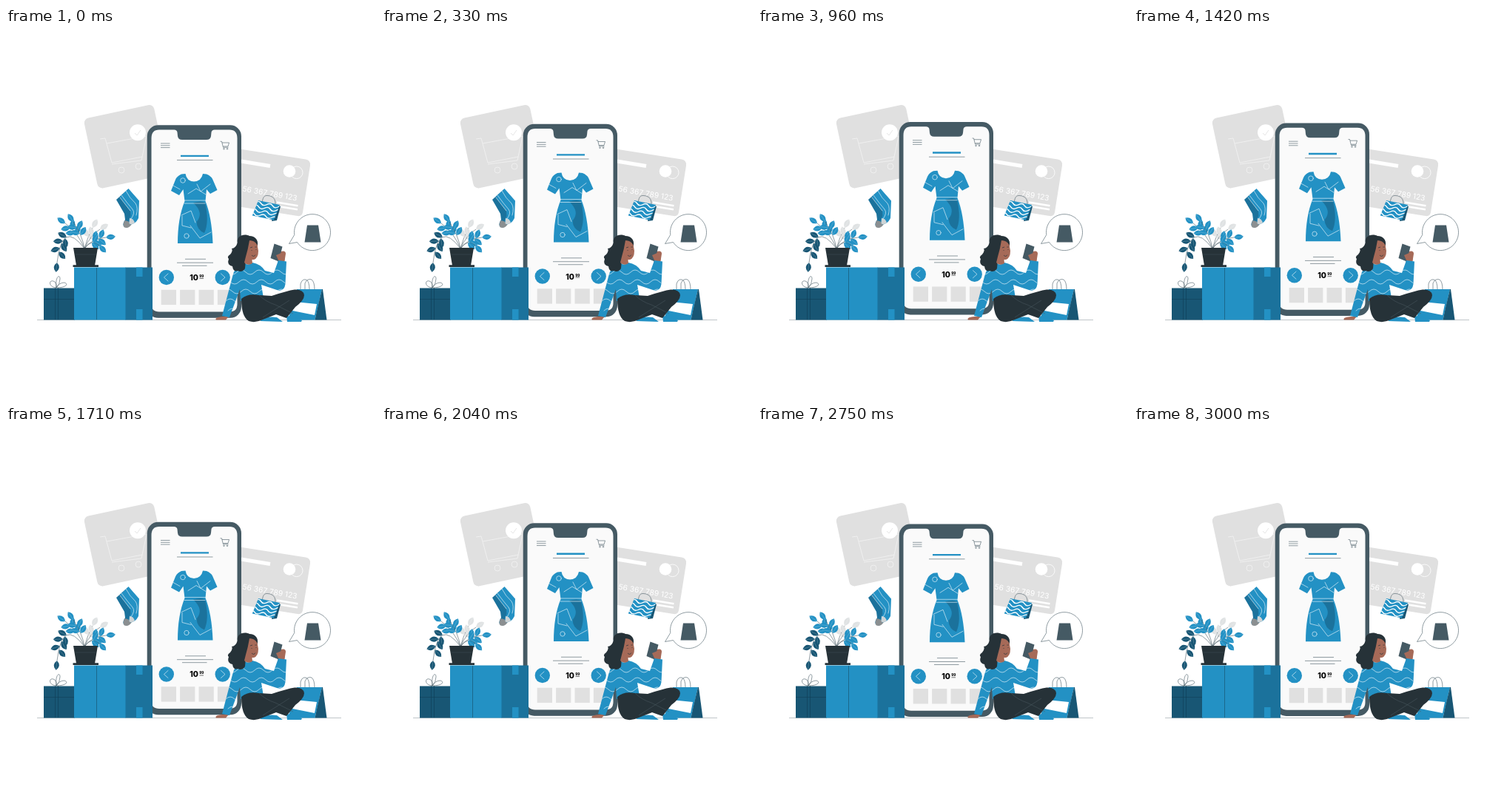
An HTML page for the animation above (3040 ms loop, 500 by 500 pixels).

```html
<!DOCTYPE html>
<html lang="en">
<head>
<meta charset="utf-8">
<title>Online shopping</title>
<style>
html,body{margin:0;width:100%;height:100%;overflow:hidden;background:#fff}
svg{display:block;width:100vw;height:100vh}
.thin{fill:none;stroke:#455a64;stroke-width:.6}
.wave{fill:none;stroke:#e8f4fa;stroke-width:.65;stroke-linecap:round}
.faint{fill:none;stroke:#f5f5f5;stroke-width:.7}
.blue{fill:#2391c4}.mid{fill:#1b729c}.deep{fill:#185674}
.dark{fill:#263238}.slate{fill:#455a64}.grey{fill:#e0e0e0}.white{fill:#fff}.skin{fill:#a66a58}
</style>
</head>
<body>
<svg viewBox="0 0 500 500" xmlns="http://www.w3.org/2000/svg">
<defs>
  <path id="sweaterShape" d="M321 317Q327 322 333 317Q344 319 350 328L362 331L368 314L379 315.500L377.500 346Q376 357 366 354L345 347L348 365L317 369L316 353L302 391L292 389L306 336Q309 322 321 317Z"/>
  <clipPath id="sweaterClip"><use href="#sweaterShape"/></clipPath>
  <clipPath id="bagClip"><rect width="30" height="20.500"/></clipPath>
</defs>

<path d="M42 394.500H453" stroke="#b0b8bc" stroke-width=".8"/>

<g id="cartCard">
  <rect class="grey" x="104.500" y="123" width="96.500" height="97" rx="7" transform="rotate(-12.1 104 123)"/>
  <path class="faint" d="M127 150L134 149L143 182L184 174M136 156L190 146L183 179L143 184"/>
  <g class="faint"><circle cx="156" cy="192" r="4"/><circle cx="179" cy="187" r="4"/></g>
  <circle class="white" cx="178" cy="141.300" r="11"/>
  <path d="M174 142l3 3 5-7" fill="none" stroke="#e0e0e0" stroke-width=".8"/>
</g>

<g id="payCard">
  <path class="grey" d="M300 161L405 177.500Q412 179 411 186L401 249Q400 255 394 254L300 239Z"/>
  <path d="M310 178.800L357 186.500" stroke="#fff" stroke-width="5"/>
  <path d="M366 235.600L394.500 240.200M366 240.800L394 245.300" stroke="#fff" stroke-width="2.500"/>
  <circle class="white" cx="383" cy="193.500" r="8.300"/>
  <circle cx="392.700" cy="195.300" r="8.300" fill="none" stroke="#fff" stroke-width=".8"/>
  <text transform="translate(319 220.500) rotate(10)" font-family="Inter,Roboto,sans-serif" font-size="10.300" fill="#fff">56 367 789 123</text>
</g>

<g id="phone">
  <rect class="slate" x="190.700" y="131.300" width="127.300" height="260.500" rx="15"/>
  <path fill="#fafafa" d="M207 137.500H227Q231 137.500 231.500 141L232 146Q232.500 151 238 151H271Q276.500 151 277 146L277.500 141Q278 137.500 282 137.500H302Q312.500 137.500 312.500 149V373Q312.500 383.500 302 383.500H207Q196.500 383.500 196.500 373V149Q196.500 137.500 207 137.500Z"/>
  <g class="thin">
    <path d="M209 156H221.500M209 158.800H221.500M209 161.600H221.500"/>
    <path d="M289.500 153.300h2l2 8h7M292 155h9.500l-1.500 5h-6.500"/>
    <circle cx="294.500" cy="163.300" r=".8"/><circle cx="299" cy="163.300" r=".8"/>
    <path d="M231 178.500H279.500M242 312.300H270M231 317.200H280M238 321.200H271.500"/>
  </g>
  <path d="M236 172.800H274" stroke="#2391c4" stroke-width="2.300"/>
  <g id="dress">
    <path class="blue" d="M237 197.500L242.500 197Q244 207 254 207.500Q264 207 266 197L271 197.500Q277 200 279 204L285.500 219L276 224L271 218L269.500 234Q278 255 279.500 291H232Q232 257 241.500 234L239.500 218L234 226L223 220L229 205Q231 200 237 197.500Z"/>
    <path class="mid" d="M253 236Q264 233 269 236Q275 262 268 277Q258 273 257.500 262Q268 250 253 236Z"/>
    <path class="wave" d="M226 213L235 218M241 233H270M241 237H269M246 224L257 217L270 225M258 211L263 221L276 211M237 253L250 247L256 263M238 254V267L250 270M249 267L262 284L277 276"/>
    <g class="wave"><circle cx="239" cy="206" r="3.300"/><circle cx="244" cy="281" r="3.200"/></g>
  </g>
  <g class="blue"><circle cx="216.800" cy="337" r="10.200"/><circle cx="292.700" cy="337" r="10.200"/></g>
  <path class="wave" d="M219 332l-5.500 5 5.500 5M290.500 332l5.500 5-5.500 5"/>
  <g font-family="Inter,Roboto,sans-serif" font-weight="800">
    <text x="248.300" y="341" font-size="10.300">10</text>
    <text x="261.300" y="337" font-size="4.600">99</text>
  </g>
  <path d="M261.500 338.500H267" stroke="#111" stroke-width=".6"/>
  <g class="grey" id="thumbs"></g>
</g>

<g id="socks">
  <path class="mid" d="M149 232L164 218.500L172 240L169 265Q164 272 159 268Q157 265 161 259L160 251Z"/>
  <path fill="#8b8f91" d="M160.500 260Q167 261 170 265Q166 271.500 160 269.500Q157 266 160.500 260Z"/>
  <path class="blue" d="M154 228L165.500 217L180 233.500L179 257Q175 265 168 265.500Q164 261 168.500 254L168 247Z"/>
  <path fill="#cfd4d6" d="M167 257Q172 257 174 263Q169 267 166.500 264Z"/>
  <path class="wave" d="M156 226Q164 237 171 245Q175 250 169 258M162 220Q167 230 175 237Q179 243 176 253M154 229L168 247"/>
</g>

<g id="handbag">
  <path class="thin" d="M346 238C347 225 351 226 357 227Q365 229 364 240" stroke-width=".9"/>
  <path class="deep" d="M364 238L371 241L366 260L359 261Z"/>
  <g transform="matrix(.97 .2 -.4 1 341 233)">
    <rect class="blue" width="30" height="20.500"/>
    <g id="bagWaves" clip-path="url(#bagClip)" fill="none" stroke="#fff" stroke-width="1.300"></g>
  </g>
</g>

<g id="bubble">
  <path fill="#fff" stroke="#455a64" stroke-width=".6" d="M389.750 279.500A24.500 24.500 0 1 1 393.500 289.500L382.500 291.500Z"/>
  <path class="slate" d="M407 266.500H422L425.500 289.500H403.500Z"/>
  <path class="thin" d="M410 268Q414 275 419 268" stroke="#222"/>
</g>

<g id="plant">
  <g id="branches"></g>
  <path class="dark" d="M91 297H124L120 321H95ZM90.500 320.300H125V323H90.500Z"/>
  <path d="M94 306H121" stroke="#455a64" stroke-width=".4"/>
</g>

<g id="boxes">
  <path class="deep" d="M51 351.500H93V394.500H51Z"/>
  <path d="M66.500 351V394M70.500 351V394M51 366.500H92" stroke="#103f57" stroke-width=".6"/>
  <path class="thin" d="M68 351C56 350 58 338 66 343Q69 346 68 351C66 336 73 332 73 339Q73 346 68 351C81 351 85 346 79 344Q72 344 68 351"/>
  <path class="blue" d="M92 323.500H162V394.500H92Z"/>
  <path class="mid" d="M161.500 323.500H198V394.500H161.500Z"/>
  <path class="blue" d="M176 323.500H184.500V336H176ZM176 380H184.500V394.500H176Z"/>
  <path d="M122.500 324V394" stroke="#185674" stroke-width=".7"/>
</g>

<g id="shopping">
  <path class="thin" d="M398 354V346Q400 339 405 340Q410 341 410 354M404 354V345Q407 338 413 340Q417 343 417 354" stroke-width=".8"/>
  <path class="blue" d="M393 353H427L417.500 394.500H381Z"/>
  <path class="white" d="M390 370L420 373L417 388L387 382Z"/>
  <path class="deep" d="M427 353H428L433.500 394.500H417.500L421 378Z"/>
</g>

<g id="woman">
  <path class="skin" d="M301 390L297 394.500H284Q281 391 293 390Z"/>
  <path class="skin" d="M366 308L371 302Q378 300 378 305L376 318L368 318Z"/>
  <path class="slate" d="M362.500 291.500L373.500 295.500L368.500 315.500L357.500 311Z"/>
  <path class="skin" d="M365 307L372 304Q377 303 377 309L376 316L369 316Z"/>
  <use class="blue" href="#sweaterShape"/>
  <g id="sweaterWaves" class="wave" clip-path="url(#sweaterClip)"></g>
  <path class="dark" d="M313 290C311 281 322 277 329 281C337 281 341 287 340 293L338 305L325 313Q323 319 323 325Q319 331 313 328Q307 330 306 322Q298 320 301 312Q298 309 303 306Q307 301 305 298Q310 298 313 290Z"/>
  <path class="skin" d="M329 287Q336 287 339.500 293L341 301Q341 311 335 313L332.500 313L333 318Q327 322 322 317L324 309Q327 299 329 287Z"/>
  <path d="M332 300v1M338 299v1M330 297l3-1M336.500 296h2M332 307q3 3 5-.5" fill="none" stroke="#263238" stroke-width=".7"/>
  <path class="blue" d="M343 396Q351 389 366 391L374 397ZM379 389Q389 389 400 395L399 397H380Z"/>
  <path class="dark" d="M318 366Q327 358 342 361L359 362Q380 355 390 353.500Q402 353 403 361Q403 368 391 377L379 392L365 387L347 394Q337 399 328 396Q318 390 318 366Z"/>
  <path d="M342 361Q351 370 364 374L388 386M347 391L383 368" fill="none" stroke="#4c5b63" stroke-width=".5"/>
</g>
</svg>
<script>
const $ = id => document.getElementById(id);
const repeat = (n, make) => Array.from({length: n}, (_, i) => make(i)).join('');

$('thumbs').innerHTML = repeat(4, i =>
  `<rect x="${209.7 + 25.4 * i}" y="353.8" width="20.300" height="20.300"/>`);

// A run of alternating smooth humps.
const wave = (x, y, step, height, humps) =>
  `<path d="M${x} ${y}q${step / 2} ${-height} ${step} 0${`t${step} 0`.repeat(humps - 1)}"/>`;
$('bagWaves').innerHTML = repeat(4, i => wave(-3 - i, 3 + 5 * i, 8, 3.5, 5));
$('sweaterWaves').innerHTML = repeat(5, i => wave(288 + 3 * i, 330 + 13 * i, 12, 6, 8));

// Branches are quadratic curves with pairs of leaves along the outer part.
const ROOT = {x: 106, y: 298};
const bend = (a, b, c, u) => (1 - u) ** 2 * a + 2 * u * (1 - u) * b + u * u * c;
const slope = (a, b, c, u) => (1 - u) * (b - a) + u * (c - b);

function leaf(x, y, angle, size, color) {
  return `<g transform="translate(${x} ${y}) rotate(${angle})">
    <path fill="${color}" d="M0 0Q${size * .5} ${-size * .55} ${size} 0Q${size * .5} ${size * .55} 0 0"/>
    <path d="M0 0H${size}" stroke="#fff" stroke-width=".3" opacity=".6"/></g>`;
}

function branch({color, bendX, bendY, tipX, tipY, pairs}) {
  const leafAt = (u, turn) => {
    const angle = Math.atan2(slope(ROOT.y, bendY, tipY, u), slope(ROOT.x, bendX, tipX, u)) * 180 / Math.PI;
    return leaf(bend(ROOT.x, bendX, tipX, u), bend(ROOT.y, bendY, tipY, u), angle + turn, 13, color);
  };
  return `<path class="thin" d="M${ROOT.x} ${ROOT.y}Q${bendX} ${bendY} ${tipX} ${tipY}"/>` +
    repeat(pairs, i => {
      const u = .5 + .45 * i / pairs;
      return leafAt(u, 55) + leafAt(u + .06, -55);
    }) + leafAt(1, 0);
}

const BLUE = '#2391c4', DEEP = '#185674', PALE = '#dfe2e3';
$('branches').innerHTML = [
  {color: PALE, bendX: 110, bendY: 283, tipX: 117, tipY: 270, pairs: 1},
  {color: PALE, bendX: 114, bendY: 280, tipX: 127, tipY: 272, pairs: 1},
  {color: DEEP, bendX: 76, bendY: 258, tipX: 69, tipY: 317, pairs: 3},
  {color: BLUE, bendX: 97, bendY: 276, tipX: 80, tipY: 264, pairs: 2},
  {color: BLUE, bendX: 103, bendY: 280, tipX: 91, tipY: 262, pairs: 2},
  {color: BLUE, bendX: 115, bendY: 285, tipX: 135, tipY: 283, pairs: 2},
  {color: BLUE, bendX: 116, bendY: 284, tipX: 126, tipY: 294, pairs: 1}
].map(branch).join('');

// The phone drifts at constant speed between its highest and lowest place.
const PERIOD = 3040, TOP_TIME = 1025, TRAVEL = 6.8;
function height(t) {
  const phase = ((t - TOP_TIME) / PERIOD + 1) % 1;
  return TRAVEL * (1 - Math.abs(2 * phase - 1));
}

const start = performance.now();
function draw(now) {
  const t = Math.max(0, now - start) % PERIOD;
  $('phone').setAttribute('transform', `translate(0 ${(height(t) - height(0)).toFixed(3)})`);
  requestAnimationFrame(draw);
}
draw(start);
</script>
</body>
</html>
```
